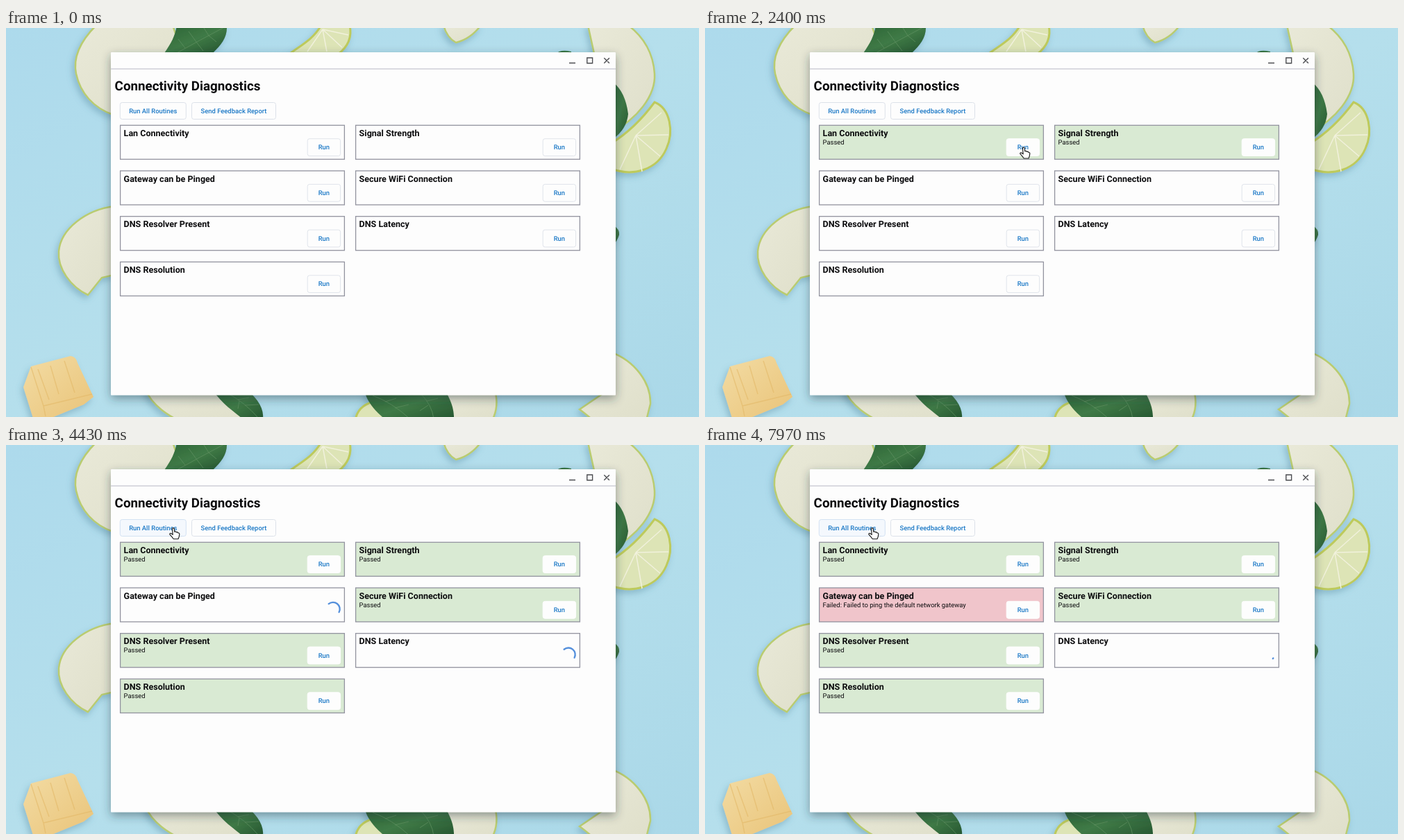
An HTML page for the animation above (8000 ms loop, 998x561 px).

```html
<!DOCTYPE html>
<html lang="en">
<head>
<meta charset="utf-8">
<title>Connectivity Diagnostics</title>
<style>
html, body { margin: 0; width: 100%; height: 100%; overflow: hidden; background: #b1dbea; }
svg { display: block; width: 100%; height: 100%; }
text { font-family: Roboto, sans-serif; fill: #0c0c0e; text-rendering: geometricPrecision; }
.title { font-size: 18.8px; font-weight: 700; }
.name { font-size: 12.54px; font-weight: 700; }
.note { font-size: 9.42px; }
.label { font-size: 9.42px; font-weight: 500; fill: #1a78c6; text-anchor: middle; }
.apple { fill: url(#flesh); stroke: #b9cc70; stroke-width: 2.5; }
.leaf { fill: url(#mint); }
.vein { fill: none; stroke: #5f9160; stroke-width: 1; opacity: .75; }
.lime { fill: #dde4b6; stroke: #bdca5c; stroke-width: 3; }
.pulp { fill: none; stroke: #f1f1dc; stroke-width: 1.5; }
</style>
</head>
<body>
<svg id="stage" viewBox="0 0 998 561">
  <defs>
    <linearGradient id="sky" x2="1" y2="1">
      <stop offset="0" stop-color="#addaec"/>
      <stop offset=".5" stop-color="#b5dfec"/>
      <stop offset="1" stop-color="#aad8e8"/>
    </linearGradient>
    <linearGradient id="flesh" x2="1" y2="1">
      <stop offset="0" stop-color="#e9e9d8"/>
      <stop offset="1" stop-color="#dfdfca"/>
    </linearGradient>
    <linearGradient id="mint" x2="1" y2="1">
      <stop offset="0" stop-color="#2c6436"/>
      <stop offset=".5" stop-color="#3f7a46"/>
      <stop offset="1" stop-color="#24542f"/>
    </linearGradient>
    <linearGradient id="pine" x2="1" y2="1">
      <stop offset="0" stop-color="#f3dca4"/>
      <stop offset="1" stop-color="#e9c378"/>
    </linearGradient>
    <filter id="soft" x="-30%" y="-30%" width="170%" height="170%">
      <feDropShadow dx="-3" dy="5" stdDeviation="5" flood-color="#3f7891" flood-opacity=".35"/>
    </filter>
    <filter id="lift" x="-10%" y="-10%" width="120%" height="125%">
      <feDropShadow dx="0" dy="5" stdDeviation="7" flood-color="#24323c" flood-opacity=".45"/>
    </filter>
  </defs>

  <rect width="998" height="561" fill="url(#sky)"/>
  <g filter="url(#soft)">
    <path class="apple" d="M130 -4C108 18 96 42 101 66C107 94 126 115 154 125L262 60L240 -4Z"/>
    <path class="leaf" d="M246 -3C243 12 238 22 228 36H298C310 24 319 14 318 -3Z"/>
    <path class="vein" d="M316 -2Q278 18 246 36M292 11L285 0M292 11L303 20M274 20L263 5M274 20L284 33M258 29L248 16"/>
    <path class="lime" d="M410 36C428 23 443 15 454 -4H495C499 15 490 29 478 38Z"/>
    <path class="pulp" d="M456 2L462 34M456 2L484 28M456 2L493 10M456 2L434 34"/>
    <path class="apple" d="M630 -4Q635 14 648 21Q669 16 684 -4Z"/>
    <path class="leaf" d="M791 38Q798 30 814 34V40H791Z"/>
    <path class="apple" d="M838 -4L872 150C908 132 936 98 934 66C932 34 917 12 896 -4Z"/>
    <path class="leaf" d="M874 78Q892 92 896 124Q894 146 874 160Z"/>
    <path class="lime" d="M934 107C957 116 962 150 951 174C938 204 904 215 872 203V166Q906 145 934 107Z"/>
    <path class="pulp" d="M907 155L944 122M907 155L954 154M907 155L942 185M907 155L916 207M907 155L884 204"/>
    <path class="apple" d="M156 257C116 262 79 289 76 322C74 347 93 373 118 385L138 360L156 356Z"/>
    <path class="leaf" d="M874 284Q884 290 883 298Q881 306 874 314Z"/>
    <path class="apple" d="M200 520C211 546 236 560 252 568H350V520Z"/>
    <path class="leaf" d="M298 522C310 542 330 554 342 565H370C372 549 363 536 348 522Z"/>
    <path class="vein" d="M318 526Q344 540 363 562M334 536L350 533M344 544L364 543M336 538L334 549"/>
    <path class="apple" d="M630 522V566H700C708 551 708 537 704 522Z"/>
    <path class="lime" d="M503 566Q506 545 529 539L552 566Z"/>
    <path class="leaf" d="M516 522C520 542 536 556 548 566H645C646 548 639 534 632 522Z"/>
    <path class="vein" d="M528 530Q556 540 582 564M596 526Q614 544 616 564M546 539L562 534M560 548L580 543M606 538L622 534M608 544L596 552"/>
    <path class="apple" d="M870 467C906 480 929 512 928 542L922 566H846Q834 556 826 550L870 520Z"/>
    <path fill="url(#pine)" d="M25 518L36 488L93 473Q101 474 103 483L126 532L112 543L56 566H40Z"/>
    <path d="M36 489L54 545L124 528M54 545L57 560M46 492L62 536M64 487L76 528M84 480L99 526" fill="none" stroke="#e2b765" stroke-width="1.5" opacity=".55"/>
  </g>

  <rect x="151" y="35" width="727" height="494.5" rx="1" fill="#fdfdfd" filter="url(#lift)"/>
  <path d="M151 59H878" stroke="#b7b8c3" stroke-width="1.2"/>
  <path d="M811 50.5H820M836.8 43H844.6V50.8H836.8ZM861.3 43.2L868.9 50.8M868.9 43.2L861.3 50.8" fill="none" stroke="#4b4c50" stroke-width="1.4"/>
  <text class="title" x="156.6" y="90">Connectivity Diagnostics</text>
  <g id="ui"></g>
  <g id="cursor" stroke-linejoin="round">
    <path id="hand" fill="#fff" stroke="#222" stroke-width="1.2" d="M-1.6 1.2Q0 -.9 1.2 1.2L1.7 5.6Q3.8 4.9 4.4 6.4Q6.2 5.8 6.8 7.3Q8.8 7 8.8 9.2L8.3 12.6L7 16H.2L-1.9 13.2L-5.2 9.3Q-5.2 7.3 -3.3 8L-.8 9.8Z"/>
    <path id="arrow" fill="#111" stroke="#fff" stroke-width="1" d="M0 0V13.5L3.2 10.6L5.3 15.4L7.6 14.4L5.5 9.8H9.6Z"/>
  </g>
</svg>
<script>
const LOOP = 8000;
const SPEED = 1.23;          // playback rate of the spinners
const CYCLE = 1333, TURN = 1568.63;
const RUN_ALL = 3700;
const FILL = { idle: "#fdfdfd", busy: "#fdfdfd", pass: "#d9ead3", fail: "#f0c5cb" };
const NOTE = { idle: "", busy: "", pass: "Passed", fail: "Failed: Failed to ping the default network gateway" };

const $ = id => document.getElementById(id);
const ui = $("ui");

function add(parent, tag, attrs, text) {
  const el = document.createElementNS("http://www.w3.org/2000/svg", tag);
  for (const k in attrs) el.setAttribute(k, attrs[k]);
  if (text) el.textContent = text;
  parent.appendChild(el);
  return el;
}

function button(parent, x, y, w, h, label) {
  const g = add(parent, "g", {});
  const box = add(g, "rect", { x, y, width: w, height: h, rx: 3, fill: "#fdfdfd", stroke: "#dce1e9" });
  add(g, "text", { class: "label", x: x + w / 2, y: y + h / 2 + 3.3 }, label);
  return { g, box };
}

const runAll = button(ui, 164.3, 107.5, 95, 24, "Run All Routines");
button(ui, 267.5, 107.5, 121, 24, "Send Feedback Report");

// Each routine: name, then the times and states it passes through.
const cards = [
  ["Lan Connectivity", [2090, "busy"], [2330, "pass"], [RUN_ALL, "busy"], [3950, "pass"]],
  ["Signal Strength", [1060, "busy"], [1250, "pass"], [RUN_ALL, "busy"], [4000, "pass"]],
  ["Gateway can be Pinged", [RUN_ALL, "busy"], [7500, "fail"]],
  ["Secure WiFi Connection", [RUN_ALL, "busy"], [4030, "pass"]],
  ["DNS Resolver Present", [RUN_ALL, "busy"], [4150, "pass"]],
  ["DNS Latency", [RUN_ALL, "busy"]],
  ["DNS Resolution", [RUN_ALL, "busy"], [4250, "pass"]]
].map(([name, ...steps], i) => {
  const g = add(ui, "g", { transform: `translate(${164.6 + (i % 2) * 339} ${140.3 + (i >> 1) * 65.7})` });
  const box = add(g, "rect", { width: 322.8, height: 49, stroke: "#92939f", "stroke-width": 1.3 });
  add(g, "text", { class: "name", x: 5, y: 15.8 }, name);
  const note = add(g, "text", { class: "note", x: 5, y: 27.8 });
  const run = button(g, 269.6, 19.4, 47.4, 24.8, "Run");
  const spin = add(g, "path", { fill: "none", stroke: "#5590dc", "stroke-width": 2.35, "stroke-linecap": "round", transform: "translate(306.3 96.2) translate(0 -0)" });
  spin.setAttribute("transform", "translate(306.3 30.6)");
  return { steps, box, note, run, spin };
});

// Cubic ease (.4, 0, .2, 1), solved by bisection.
function ease(x) {
  let lo = 0, hi = 1;
  for (let i = 0; i < 20; i++) {
    const s = (lo + hi) / 2, r = 1 - s;
    if (1.2 * r * r * s + .6 * r * s * s + s * s * s < x) lo = s; else hi = s;
  }
  return 3 * (1 - lo) * lo * lo + lo ** 3;
}

function polar(deg) {
  const a = deg * Math.PI / 180;
  return `${(9.8 * Math.sin(a)).toFixed(2)} ${(-9.8 * Math.cos(a)).toFixed(2)}`;
}

// The arc grows from its tail to 270 degrees, then the tail catches up.
function spinnerPath(t) {
  const time = (t - 6970) * SPEED + 4;
  const n = Math.floor(time / CYCLE);
  const p = (time / CYCLE - n) * 2;
  const base = 293 + time * 360 / TURN - 90 * n;
  const from = p < 1 ? 0 : 268 * ease(p - 1);
  const to = p < 1 ? .5 + 269.5 * ease(p) : 270;
  return `M${polar(base + from)}A9.8 9.8 0 ${to - from > 180 ? 1 : 0} 1 ${polar(base + to)}`;
}

// Pointer stops: time, x, y.
const stops = [
  [380, 1004, 330], [900, 795, 172], [1340, 795, 172], [1430, 780, 170], [1950, 459, 172],
  [2450, 459, 172], [3200, 249, 121], [3390, 249, 121], [3600, 241, 119.5], [LOOP, 241, 119.5]
];

function pointer(t) {
  if (t < stops[0][0]) return null;
  const i = Math.min(stops.findIndex(s => s[0] > t), stops.length - 1);
  const a = stops[i - 1], b = stops[i];
  let k = (t - a[0]) / (b[0] - a[0]);
  k = k * k * (3 - 2 * k);
  return [a[1] + (b[1] - a[1]) * k, a[2] + (b[2] - a[2]) * k];
}

const show = (el, on) => el.setAttribute("visibility", on ? "visible" : "hidden");
const inside = (p, x, y, w, h) => p && p[0] > x && p[0] < x + w && p[1] > y && p[1] < y + h;

function draw(t) {
  const arc = spinnerPath(t);
  for (const c of cards) {
    let state = "idle";
    for (const [at, s] of c.steps) if (t >= at) state = s;
    const plain = state === "idle" || state === "busy";
    c.box.setAttribute("fill", FILL[state]);
    c.note.textContent = NOTE[state];
    c.run.box.setAttribute("stroke", plain ? "#e0e4eb" : "#fdfdfd");
    show(c.run.g, state !== "busy");
    show(c.spin, state === "busy");
    c.spin.setAttribute("d", arc);
  }

  const p = pointer(t);
  const onAll = inside(p, 164, 107, 96, 25);
  const onRun = inside(p, 773, 159, 49, 26) || inside(p, 434, 159, 48, 26);
  runAll.box.setAttribute("fill", onAll ? "#f4f8fd" : "#fdfdfd");
  runAll.box.setAttribute("stroke", onAll ? "#d3e2f3" : "#dce1e9");
  show($("hand"), p && (onAll || onRun));
  show($("arrow"), p && !(onAll || onRun));
  if (p) $("cursor").setAttribute("transform", `translate(${p[0]} ${p[1]})`);
}

const start = performance.now();
function tick() {
  draw((performance.now() - start) % LOOP);
  requestAnimationFrame(tick);
}
tick();
</script>
</body>
</html>
```
